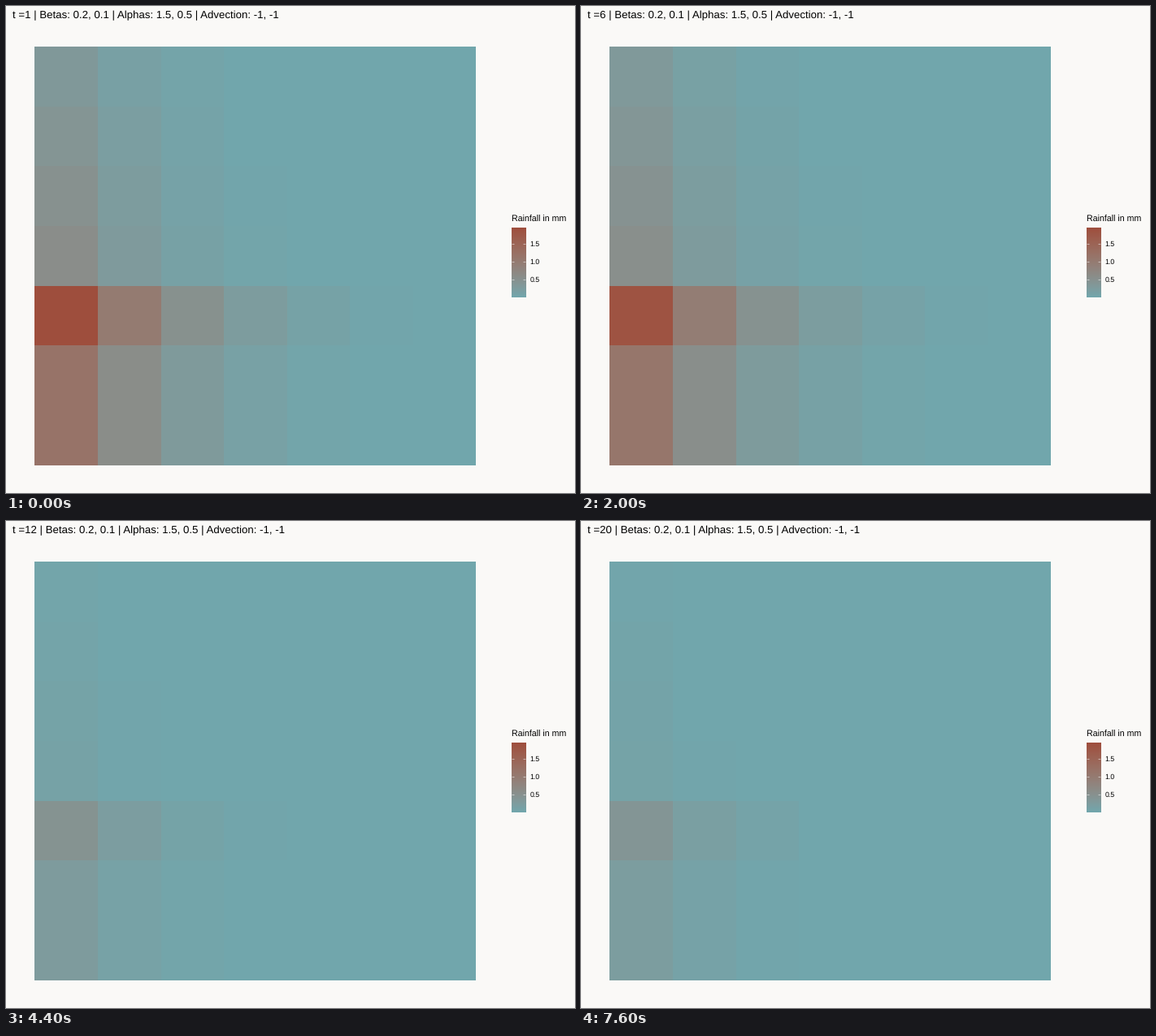
A matplotlib script that plays this animation: 700 px wide and 600 px high, repeating every 8 s.

```python
import numpy as np
import matplotlib as mpl
import matplotlib.pyplot as plt
from matplotlib.animation import FuncAnimation

mpl.rcParams["text.hinting"] = "none"
mpl.rcParams["font.family"] = "Liberation Sans"

WIDTH, HEIGHT, DPI = 700, 600, 72
STEPS, CELLS = 20, 7
LOW, HIGH = (113, 166, 172), (158, 78, 61)
PAPER = "#faf9f7"

TO_XYZ = np.array([[.4124, .3576, .1805],
                   [.2126, .7152, .0722],
                   [.0193, .1192, .9505]])
WHITE = TO_XYZ.sum(axis=1)


def rgb_to_lab(rgb):
    c = np.array(rgb) / 255
    linear = np.where(c > .04045, ((c + .055) / 1.055) ** 2.4, c / 12.92)
    x, y, z = np.cbrt(TO_XYZ @ linear / WHITE)
    return np.array([116 * y - 16, 500 * (x - y), 200 * (y - z)])


def lab_to_rgb(lab):
    y = (lab[..., 0] + 16) / 116
    xyz = np.stack([y + lab[..., 1] / 500, y, y - lab[..., 2] / 200], -1) ** 3 * WHITE
    linear = np.clip(xyz @ np.linalg.inv(TO_XYZ).T, 0, 1)
    return np.where(linear > .0031308,
                    1.055 * linear ** (1 / 2.4) - .055, 12.92 * linear)


LAB_LOW, LAB_HIGH = rgb_to_lab(LOW), rgb_to_lab(HIGH)


def colour(level):
    """Blend from LOW to HIGH in Lab space."""
    level = np.asarray(level)[..., None]
    return lab_to_rgb(LAB_LOW + level * (LAB_HIGH - LAB_LOW))


def strength(t):
    """Storms burst, then fade exponentially between a few key times."""
    times = [1, 5, 6, 7, 10, 12, 14, 17, 20]
    peaks = [1, .33, .95, .76, .53, .25, .46, .33, .22]
    return np.exp(np.interp(t, times, np.log(peaks)))


def rainfall(t):
    """One wet row, drier above than below, decaying to the right."""
    index = np.arange(CELLS)
    rows = np.where(index > 4, .61, .185 + .042 * index)
    rows[4] = 1
    level = 1.03 * strength(t) * np.outer(rows, .525 ** index) - .03
    return np.clip(level, 0, 1)


def title(t):
    return f"t ={t} | Betas: 0.2, 0.1 | Alphas: 1.5, 0.5 | Advection: -1, -1"


fig = plt.figure(figsize=(WIDTH / DPI, HEIGHT / DPI), dpi=DPI, facecolor=PAPER)
ax = fig.add_axes([0, 0, 1, 1])
ax.axis("off")


def label(x, baseline, text, size):
    return ax.text(x, baseline, text, size=size, color="black", va="baseline")


# Cell edges fall on whole pixels
x_edges = np.ceil(np.linspace(35, 578, CELLS + 1))
y_edges = np.round(np.linspace(50, 565.8, CELLS + 1))
grid = ax.pcolormesh(x_edges, y_edges, colour(rainfall(1)))
heading = label(7.7, 15.5, title(1), 13.2)

# Legend
label(621.6, 266, "Rainfall in mm", 10.6)
ax.pcolormesh([622, 640], np.arange(273, 360), colour(np.linspace(1, 0, 86))[:, None])
for value in (.5, 1, 1.5):
    y = 359 - 44 * value
    for x in (622, 636):
        ax.plot([x, x + 3.4], [y, y], color="white", lw=.5, solid_capstyle="butt")
    label(644.8, y + 3.3, f"{value:.1f}", 8.8)

ax.set_xlim(0, WIDTH)
ax.set_ylim(HEIGHT, 0)


def update(frame):
    t = frame + 1
    grid.set_array(colour(rainfall(t)))
    heading.set_text(title(t))
    return grid, heading


anim = FuncAnimation(fig, update, frames=STEPS, interval=400,
                     repeat=True, repeat_delay=0)
plt.show()
```
